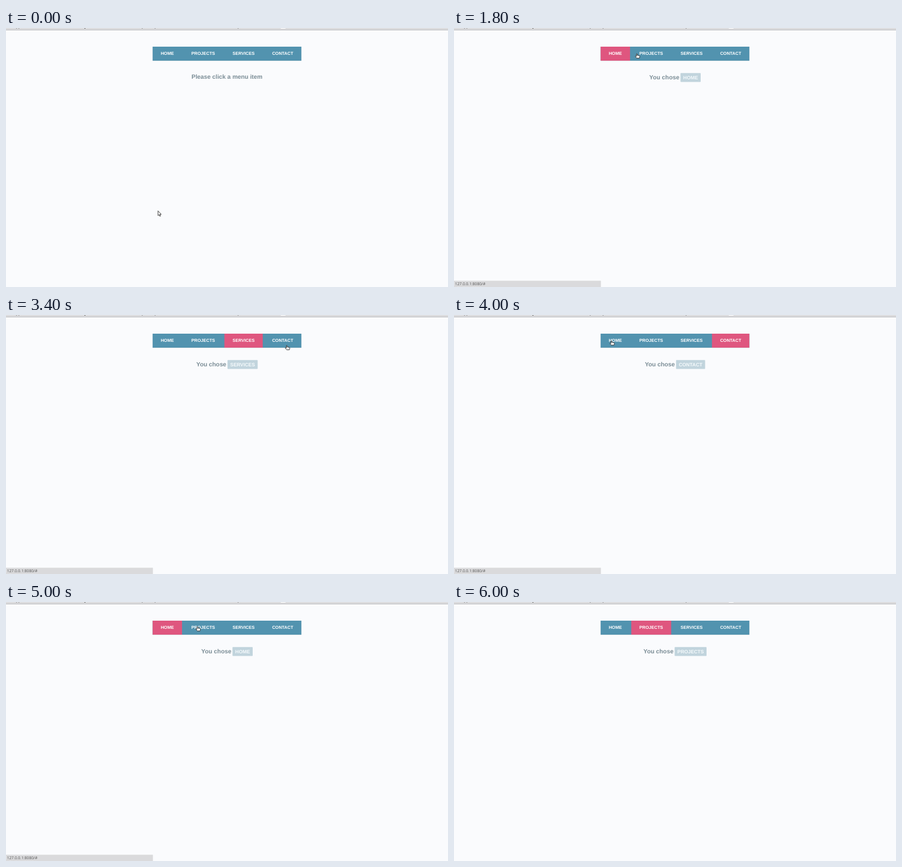
Recreate the animation shown at these times as an HTML page. Size 756x444 px, loop 7.4 s.

```html
<!DOCTYPE html>
<html lang="en">
<head>
<meta charset="utf-8">
<title>Menu demo</title>
<style>
  html, body { margin: 0; width: 100%; height: 100%; overflow: hidden; background: #fafbfd; }
  svg { display: block; width: 756px; height: 444px; }
  text { font: bold 7.5px "Liberation Sans", Arial, sans-serif; fill: #fff; text-rendering: geometricPrecision; }
  .lead { font-size: 10.3px; fill: #7b8d96; }
  #chipText { font-size: 8.4px; fill: #f5fafc; }
  #status text { font: 6.7px "Open Sans", "Noto Sans", sans-serif; fill: #555; }
  .cursor { fill: #fff; stroke: #2b2b2b; stroke-width: .9; stroke-linejoin: round; }
</style>
</head>
<body>
<svg viewBox="0 0 756 444">
  <rect width="756" height="3" fill="#dbdbdd"/>
  <rect y="3" width="756" height="1" fill="#bdbdc0"/>
  <rect x="470" width="8" height="1" fill="#fff"/>
  <path d="M18 0v1M22 0v1M134 .5h2M233 0v1M255 0v1M397 0v1" stroke="#666"/>

  <rect x="250.8" y="32.3" width="254.4" height="24.2" fill="#d0d6da"/>
  <rect x="250.8" y="32" width="254.4" height="24" fill="#5293af"/>
  <rect id="active" y="32" height="24" fill="#df567f"/>
  <g id="menu"></g>

  <text id="prompt" class="lead" x="378" y="87.2" text-anchor="middle">Please click a menu item</text>
  <g id="answer">
    <text id="chose" class="lead" y="87.6">You chose</text>
    <rect id="chip" y="77.2" height="15.4" rx=".8" fill="#c1d4dd"/>
    <text id="chipText" y="87.8"></text>
  </g>

  <g id="status">
    <rect y="433.3" width="251.3" height="11" fill="#dadadc"/>
    <text x="1.7" y="441.4">127.0.0.1:8080/#</text>
  </g>

  <path id="arrow" class="cursor" d="M0 .5V8.6L1.8 7L3.1 9.8L4.4 9.2L3.1 6.4H5.5Z"/>
  <path id="hand" class="cursor" d="M-1.9 -3.6Q-1.2 -4.2 -.6 -3.4V-1.2L2.6 -.7Q3.9 -.4 3.8 .8L3.2 3.7H-1.4L-3.9 .7Q-3.6 -.4 -2.4 .3L-1.9 .7Z"/>
</svg>
<script>
const LOOP = 7400, STEP = 200;
const MENU_LEFT = 250.8, PAD = 13.9, GAP = 2.1;
const CENTRE = 378, CHIP_PAD = 4.7, WORD_GAP = 2;

// Pointer stops; a stop with an item is clicked as the pointer leaves it.
const stop = (arrive, x, y, leave = arrive, item = "") => ({ arrive, x, y, leave, item });
const stops = [
  stop(0, 260, 313),
  stop(800, 366, 158),
  stop(1200, 280.7, 55),
  stop(1400, 272, 48, 1600, "HOME"),
  stop(2000, 356, 48, 2200, "PROJECTS"),
  stop(2600, 414.5, 48, 3000, "SERVICES"),
  stop(3400, 481.5, 56, 3600, "CONTACT"),
  stop(4000, 270.5, 48, 4400, "HOME"),
  stop(5000, 328.7, 46, 5200, "PROJECTS"),
  stop(5400, 267.5, 81),
  stop(6000, -50, 400)
];

const $ = id => document.getElementById(id);
const set = (id, attrs) => {
  for (const name in attrs) $(id).setAttribute(name, attrs[name]);
};
const show = (id, on) => $(id).style.display = on ? "" : "none";
const textWidth = node => node.getComputedTextLength();

// Lay the menu out from the widths of its labels.
const boxes = {};
let left = MENU_LEFT;
for (const label of ["HOME", "PROJECTS", "SERVICES", "CONTACT"]) {
  $("menu").insertAdjacentHTML("beforeend", `<text x="${left + PAD}" y="46.4">${label}</text>`);
  const width = textWidth($("menu").lastChild) + 2 * PAD;
  boxes[label] = { x: left, width };
  left += width + GAP;
}

function pointerAt(t) {
  const i = stops.findLastIndex(s => s.arrive <= t);
  const from = stops[i], to = stops[i + 1] || from;
  const k = t > from.leave && to !== from ? (t - from.leave) / (to.arrive - from.leave) : 0;
  return { x: from.x + (to.x - from.x) * k, y: from.y + (to.y - from.y) * k };
}

function showAnswer(item) {
  $("chipText").textContent = item;
  const lead = textWidth($("chose")) + WORD_GAP;
  const width = textWidth($("chipText")) + 2 * CHIP_PAD;
  const x = CENTRE - (lead + width) / 2;
  set("active", boxes[item]);
  set("chose", { x });
  set("chip", { x: x + lead, width });
  set("chipText", { x: x + lead + CHIP_PAD });
}

function draw(now) {
  const t = Math.floor(now % LOOP / STEP) * STEP;
  const { x, y } = pointerAt(t);
  const overMenu = y < 60;
  const clicked = stops.findLast(s => s.item && s.leave <= t);

  for (const id of ["arrow", "hand"]) set(id, { transform: `translate(${x} ${y})` });
  show("arrow", !overMenu);
  show("hand", overMenu);
  show("status", t >= 1200 && t < 5600);
  show("prompt", !clicked);
  show("answer", clicked);
  show("active", clicked);
  if (clicked) showAnswer(clicked.item);
}

const begin = performance.now();
function tick() {
  draw(performance.now() - begin);
  requestAnimationFrame(tick);
}
tick();
</script>
</body>
</html>
```
